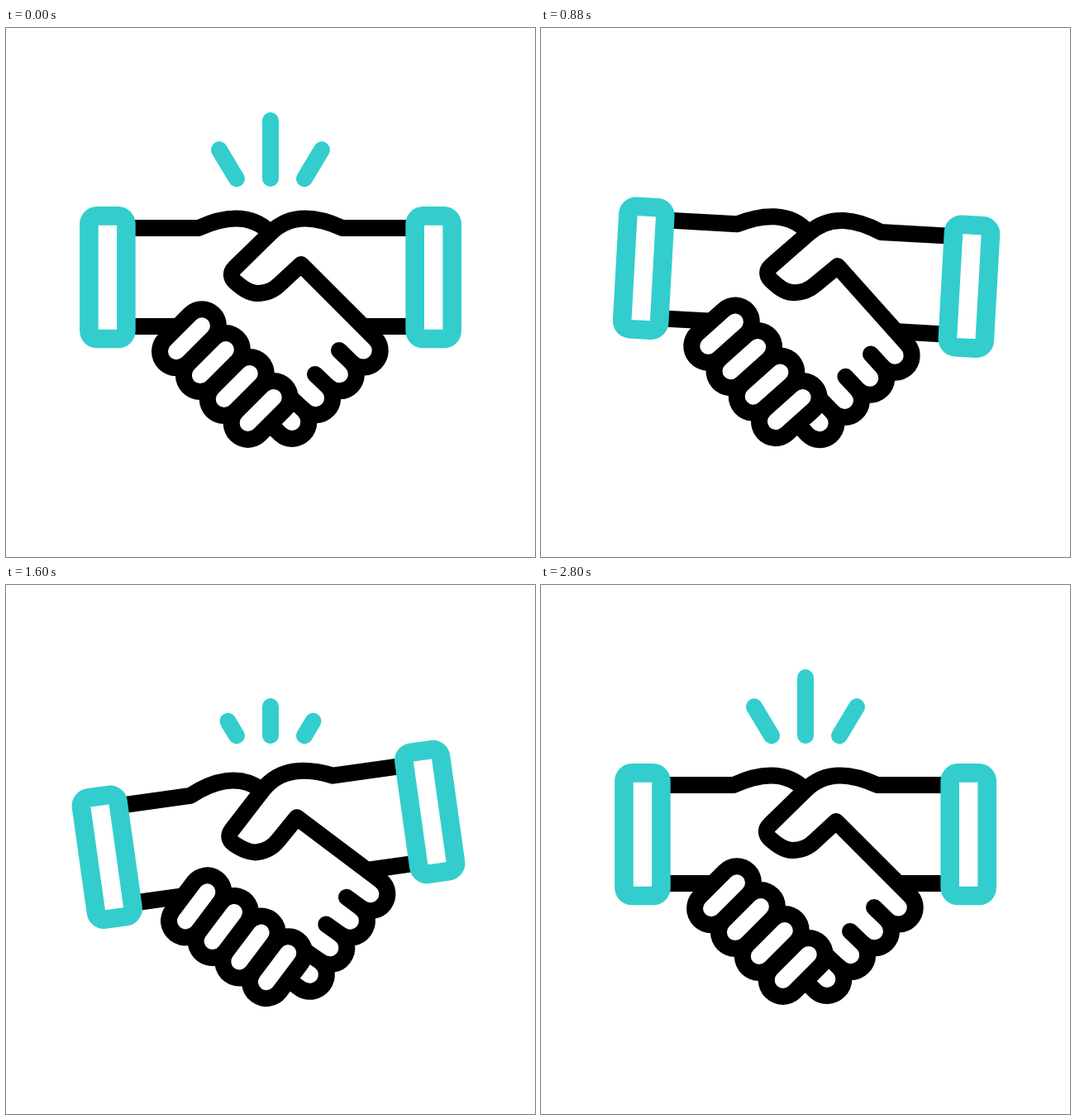
An HTML page with a canvas for the animation above (3 s loop, 640 by 640 pixels).

```html
<!DOCTYPE html>
<html>
<head>
<meta charset="utf-8">
<title>Handshake</title>
<style>
html, body { margin: 0; height: 100%; overflow: hidden; background: #fff; }
canvas { display: block; }
</style>
</head>
<body>
<canvas id="stage" width="640" height="640"></canvas>
<script>
const ctx = document.getElementById('stage').getContext('2d');
const TEAL = '#33cdcd';
const LOOP = 3000;

const clamp = x => Math.min(1, Math.max(0, x));
const smooth = x => { x = clamp(x); return x * x * (3 - 2 * x); };

// Linear interpolation through [time, value] keys
function track(keys, t) {
  if (t <= keys[0][0]) return keys[0][1];
  for (let i = 1; i < keys.length; i++) {
    const [t0, v0] = keys[i - 1], [t1, v1] = keys[i];
    if (t < t1) return v0 + (v1 - v0) * (t - t0) / (t1 - t0);
  }
  return keys[keys.length - 1][1];
}

const SWING = [[800, 0], [1000, 8], [1200, -8], [1400, 8], [1600, -8], [1800, 0]];
const FLEX = [[0, 0], [400, 1], [800, 0]];

function stroke(d, color = '#000', width = 20) {
  ctx.strokeStyle = color;
  ctx.lineWidth = width;
  ctx.stroke(new Path2D(d));
}

function rightHand(k) {
  const tx = -14.5 * k, ty = 13 * k;
  const p = (x, y) => `${x + tx} ${y + ty} `;
  const fx = 433.2 + 21 * k, fy = 391 + 18 * k, h = 14.4;
  stroke('M490 242H407C393 235.5 378 230.5 362 230.5C345 230.5 332 236 320 248' +
    'L' + p(277, 290) + 'C' + p(271, 296) + p(272, 302) + p(277, 307) +
    'C' + p(285, 314) + p(294, 321) + p(304, 321) +
    'C' + p(315, 321) + p(324, 317) + p(331, 310) + 'L357 286' +
    `M${357 + 3.5 * k} ${286 - 4 * k}L${fx + h} ${fy - h}`);
  stroke('M490 361H434');
  for (let i = 0; i < 4; i++) {
    const x = fx - 2 * h * i, y = fy + 2 * h * i;
    const end = i < 3 ? `${403 - 29 * i + 7 * k} ${390 + 29 * i + 3.5 * k}` : '318 478';
    stroke(`M${x + h} ${y - h}A20.4 20.4 0 0 1 ${x - h} ${y + h}L${end}`);
  }
}

function leftHand(k) {
  stroke('M150 242H233C247 235.5 262 230.5 278 230.5C294 230.5 308 236 319 247');
  stroke('M150 361H210');
  let fingers = '';
  for (let i = 0; i < 4; i++) {
    const x = 237 + 28.9 * i - 11.2 * k, y = 360.2 + 28.9 * i + 9.3 * k;
    fingers += `M${x} ${y}l-31 31`;
  }
  stroke(fingers, '#000', 60);
  stroke(fingers, '#fff', 20);
}

function cuff(x) {
  const path = new Path2D();
  path.roundRect(x, 227.4, 45, 148.6, 9.7);
  ctx.strokeStyle = TEAL;
  ctx.lineWidth = 22.6;
  ctx.stroke(path);
}

// Visible part of each ray, from tail to head
function rayRange(t) {
  if (t < 400) return [smooth(t / 400), 1];
  if (t < 1400) return null;
  if (t < 1800) return [0, smooth((t - 1400) / 400)];
  if (t < 2200) return [smooth((t - 1800) / 400), 1];
  if (t < 2210) return null;
  return [0, smooth((t - 2400) / 400)];
}

function rays(t) {
  const range = rayRange(t);
  if (!range) return;
  const [tail, head] = range;
  for (const [x, y, dx, dy] of [[320, 182, 0, -70], [279, 182.3, -21, -35], [361, 182.3, 21, -35]]) {
    const at = s => `${x + dx * s} ${y + dy * s}`;
    stroke(`M${at(tail)}L${at(head + 0.0005)}`, TEAL);
  }
}

function draw(now) {
  const t = now % LOOP;
  const k = track(FLEX, t);
  ctx.fillStyle = '#fff';
  ctx.fillRect(0, 0, 640, 640);
  ctx.lineCap = ctx.lineJoin = 'round';
  ctx.save();
  ctx.translate(320, 320);
  ctx.rotate(track(SWING, t) * Math.PI / 180);
  ctx.translate(-320, -320);
  rightHand(k);
  leftHand(k);
  cuff(100.4);
  cuff(494.7);
  ctx.restore();
  rays(t);
}

let start;
function tick(now) {
  start ??= now;
  draw(now - start);
  requestAnimationFrame(tick);
}
requestAnimationFrame(tick);
</script>
</body>
</html>
```
